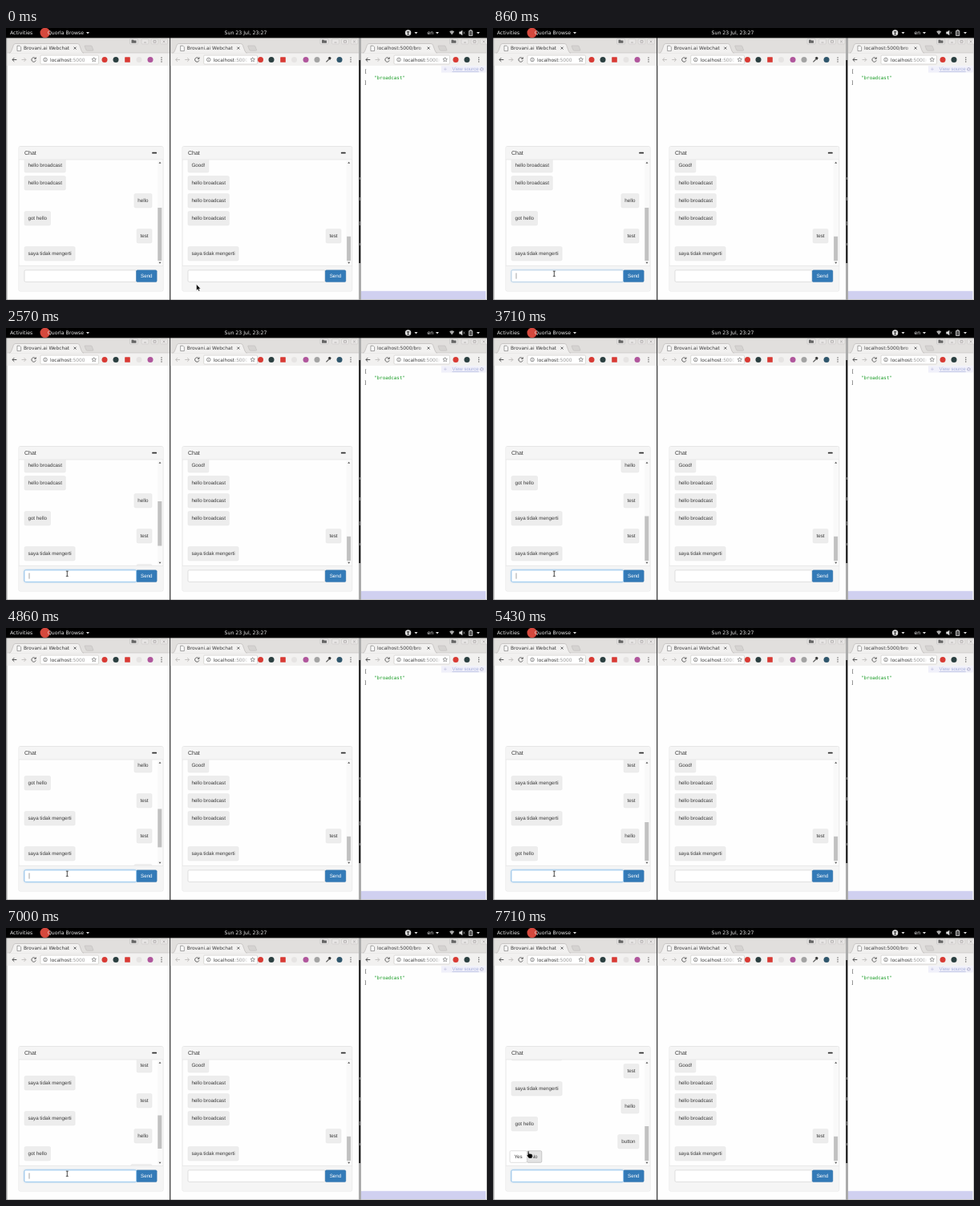
Animation, 600 px wide and 339 px high, one loop 8 s. Source, as an HTML page:

```html
<!DOCTYPE html>
<html lang="en">
<head>
<meta charset="utf-8">
<title>Webchat</title>
<style>
  html, body { margin: 0; width: 100%; height: 100%; overflow: hidden; background: #fff; }
  svg { display: block; width: 600px; height: 339px; }
  text { font: 6.28px "Liberation Sans", Arial, sans-serif; fill: #3a3a3a; text-rendering: geometricPrecision; white-space: pre; }
  text.ui { font: 5.9px "DejaVu Sans", sans-serif; }
  text.shell { font: 6.2px "DejaVu Sans", sans-serif; fill: #e6e6e6; }
  text.mono { font: 5.9px "DejaVu Sans Mono", monospace; }
  text.head { font-size: 7px; }
  .line { fill: none; stroke: #555; stroke-width: .9; }
  .bubble { fill: #ededed; stroke: #e4e4e4; stroke-width: .5; }
  .glow { fill: #fff; stroke: #82bcec; stroke-width: .7; filter: drop-shadow(0 0 1.2px rgba(102, 175, 233, .6)); }
</style>
</head>
<body>
<svg id="stage" viewBox="0 0 600 339">
  <defs>
    <linearGradient id="fade"><stop offset="0" stop-color="#fff" stop-opacity="0"/><stop offset="1" stop-color="#fff"/></linearGradient>
    <linearGradient id="tabFade"><stop offset="0" stop-color="#f2f1f0" stop-opacity="0"/><stop offset="1" stop-color="#f2f1f0"/></linearGradient>
    <clipPath id="body"><rect x="16" y="164" width="416" height="132"/></clipPath>
  </defs>
</svg>
<script>
const LOOP = 8000, PITCH = 22, FIRST_Y = 171.2;
const stage = document.getElementById('stage');

const rect = (x, y, w, h, fill, more = '') =>
  `<rect x="${x}" y="${y}" width="${w}" height="${h}" fill="${fill}" ${more}/>`;
const circle = (x, y, r, fill, more = '') => `<circle cx="${x}" cy="${y}" r="${r}" fill="${fill}" ${more}/>`;
const path = (d, more = 'class="line"') => `<path d="${d}" ${more}/>`;
const text = (x, y, s, cls = '', more = '') => `<text x="${x}" y="${y}" class="${cls}" ${more}>${s}</text>`;
const add = markup => stage.insertAdjacentHTML('beforeend', markup);
const caretDown = x => path(`M${x - 2} 5h4l-2 2.6z`, 'fill="#ddd"');

function star(x, y) {
  const points = Array.from({ length: 10 }, (_, i) => {
    const r = i % 2 ? 1.3 : 2.9, a = i * Math.PI / 5;
    return `${x + r * Math.sin(a)},${y - r * Math.cos(a)}`;
  });
  return `<polygon points="${points.join(' ')}" fill="none" stroke="#666" stroke-width=".6"/>`;
}

function shellBar() {
  return rect(0, 0, 600, 12.4, '#000') +
    text(5, 8.4, 'Activities', 'shell') +
    circle(48.7, 6, 6.2, '#d5483d') +
    text(52, 8.4, 'Quorla Browse', 'shell') + caretDown(102) +
    text(299, 8.4, 'Sun 23 Jul, 23:27', 'shell', 'text-anchor="middle"') +
    circle(501.6, 6, 3.7, '#ddd') +
    path('M499.8 4.9h3.6M501.6 4.2v2.8l-1 1.8M501.6 7l1 1.8', 'stroke="#111" stroke-width=".8" fill="none"') +
    caretDown(511.5) + text(525.5, 8.2, 'en', 'shell') + caretDown(538) +
    path('M553.2 4.4q3-2.4 6 0l-3 4.2z', 'fill="#aaa"') +
    path('M565.5 4.8h1.6l2-1.8v6l-2-1.8h-1.6zM570.4 4.5l2 3M572.4 4.5l-2 3', 'fill="#ddd" stroke="#ddd" stroke-width=".4"') +
    path('M577.6 3.6h1.2v-1h1.8v1h1.2v6h-4.2z', 'fill="#555" stroke="#ddd" stroke-width=".8"') + caretDown(589);
}

// A browser window; ox shifts everything that sits in the tab strip and toolbar.
function browser({ x, w, ox, title, url, port, urlEnd, userX, backColor = '#555', icons, menuX }) {
  const controls = [14, 26, 37.5].map(d => userX + d);
  const extension = ([ix, color, square]) => square
    ? rect(ix - 3.3, 36.2, 6.6, 6.6, color, 'rx=".6"')
    : circle(ix, 39.5, 3.5, color);
  return rect(x, 12, w, 326, '#fefefe') +
    rect(x, 12, w, 19.5, '#e1dfdd') +
    rect(x, 31, w, 16, '#f2f1f0') +
    path(`M${x} 31H${x + w}`, 'stroke="#c3c1bf" stroke-width=".6"') +
    path(`M${ox + 4} 31.4q2-.4 3-3.4l2.4-6.6q.7-1.9 2.6-1.9H${ox + 89}q1.9 0 2.6 1.9l2.4 6.6q1 3 3 3.4`,
      'fill="#f2f1f0" stroke="#b5b3b1" stroke-width=".6"') +
    path(`M${ox + 98.5} 22h7.4q1 0 1.4 1l1.6 4.3q.2.9-.8.9h-6.6q-1.2 0-1.6-1l-1.8-4.3q-.2-.9.4-.9z`,
      'fill="#d5d3d1" stroke="#b9b7b5" stroke-width=".5"') +
    path(`M${ox + 14} 22.2h3l1.6 1.6v4.8h-4.6z`, 'fill="#fff" stroke="#666" stroke-width=".6"') +
    text(ox + 22, 27.4, title, 'ui') +
    rect(ox + 73, 21, 9.5, 9, 'url(#tabFade)', title.includes('/') ? '' : 'opacity="0"') +
    path(`M${ox + 84.6} 23.6l3 3m0-3l-3 3`) +
    rect(userX - 5, 13.4, 10, 6.8, '#e6e4e3', 'stroke="#bbb" stroke-width=".5" rx="1"') +
    path(`M${userX - 3} 14.8h2.4l.8.8h2.8v3.2h-6z`, 'fill="#666"') +
    controls.map(c => rect(c - 4.4, 13.8, 8.8, 6.2, '#e8e6e5', 'stroke="#c4c2c0" stroke-width=".5" rx="1"')).join('') +
    path(`M${controls[0] - 1.5} 18h3M${controls[1] - 1.5} 15.6h3v2.6h-3zM${controls[2] - 1.3} 15.6l2.6 2.6m0-2.6l-2.6 2.6`,
      'fill="none" stroke="#a2a0a0" stroke-width=".7"') +
    path(`M${ox + 13.3} 39.5h-5.4m2.4-2.4l-2.4 2.4 2.4 2.4`, `fill="none" stroke="${backColor}" stroke-width="1"`) +
    path(`M${ox + 19.5} 39.5h5.4m-2.4-2.4l2.4 2.4-2.4 2.4`, 'fill="none" stroke="#c4c2c0" stroke-width="1"') +
    path(`M${ox + 36.8} 37.9a2.7 2.7 0 1 0 .4 2.4M${ox + 37.3} 36.4v2h-2`) +
    rect(ox + 43, 34, urlEnd - ox - 43, 11, '#fff', 'stroke="#c6c4c2" stroke-width=".6" rx="1.2"') +
    circle(ox + 49, 39.5, 2.3, 'none', 'stroke="#666" stroke-width=".7"') +
    path(`M${ox + 49} 39.1v1.6M${ox + 49} 37.8v.6`, 'stroke="#666" stroke-width=".7"') +
    text(ox + 55, 41.6, `${url}<tspan fill="#999">${port}</tspan>`, 'ui') +
    rect(urlEnd - 18, 35, 6.5, 9, 'url(#fade)') + rect(urlEnd - 11.6, 35, 11, 9, '#fff') +
    star(urlEnd - 5.8, 39.5) +
    icons.map(extension).join('') +
    [37, 39.5, 42].map(y => circle(menuX, y, .7, '#555')).join('');
}

// Chat panel frame; the messages are added separately.
function panel(x, right) {
  const inputEnd = right - 33.5;
  return rect(x, 147.5, right - x, 180.5, '#fefefe', 'stroke="#ddd" stroke-width=".7" rx="1.8"') +
    rect(x + .3, 147.9, right - x - .6, 16, '#f5f5f5', 'rx="1.5"') +
    rect(x + .3, 296.3, right - x - .6, 31.4, '#f5f5f5', 'rx="1.5"') +
    path(`M${x} 164h${right - x}M${x} 296.3h${right - x}`, 'stroke="#ddd" stroke-width=".6"') +
    text(x + 7, 158.2, 'Chat', 'head') +
    rect(right - 13.8, 154.8, 5.8, 1.8, '#333', 'rx=".5"') +
    rect(right - 7, 164.4, 6, 131.4, '#f9f9f9') +
    path(`M${right - 5.5} 168.8h3l-1.5-2zM${right - 5.5} 291.8h3l-1.5 2z`, 'fill="#505050"') +
    rect(x + 7, 301.8, inputEnd - x - 7, 14.6, '#fff', 'stroke="#ccc" stroke-width=".6" rx="1.5"') +
    rect(inputEnd, 301.7, 25.7, 14.8, '#337ab7', 'stroke="#2e6da4" stroke-width=".4" rx="1.5"') +
    text(inputEnd + 12.8, 311.3, 'Send', '', 'text-anchor="middle" style="fill:#fff"');
}

// Messages beginning with ">" are the visitor's own and sit on the right.
function addMessages(id, left, right, messages) {
  add(`<g clip-path="url(#body)"><g id="${id}"></g></g>`);
  const list = document.getElementById(id);
  messages.forEach((message, i) => {
    const own = message.startsWith('>'), y = FIRST_Y + i * PITCH;
    list.insertAdjacentHTML('beforeend', `<g><rect class="bubble" y="${y - 8.7}" height="17.4" rx="1.6"/>` +
      text(0, y + 2, message.replace('>', '')) + '</g>');
    const [box, label] = list.lastChild.children;
    const width = label.getComputedTextLength() + 8.8;
    const x = own ? right - width : left;
    box.setAttribute('x', x);
    box.setAttribute('width', width);
    label.setAttribute('x', x + 4.4);
  });
  return list;
}

const red = '#d83a34', dark = '#2b3f40', faint = '#e6e4e3', violet = '#b0569c';
add(rect(0, 0, 600, 339, '#c9c9c9') +
  path('M.9 12V339', 'stroke="#777" stroke-width="1"') +
  path('M204.7 12V339', 'stroke="#3a3a3a" stroke-width="1.3"') +
  rect(440, 12, 3, 327, '#aaa') + rect(440.3, 40, 1.8, 253, '#161616') +
  path('M441.3 186v3M441.3 211v4M441.3 241v5M441.3 268v3', 'stroke="#aaa" stroke-width=".8"') +
  browser({ x: 1.6, w: 202.4, ox: 0, title: 'Brovani.ai Webchat', url: 'localhost', port: ':5000', urlEnd: 115.5, userX: 159.5,
    icons: [[123, red], [137, dark], [151.5, red, 1], [166, faint], [180, violet]], menuX: 194 }) +
  browser({ x: 205.6, w: 234.4, ox: 203.7, title: 'Brovani.ai Webchat', url: 'localhost', port: ':5000', urlEnd: 313.5, userX: 397,
    backColor: '#c4c2c0', menuX: 430,
    icons: [[317.5, red], [331, dark], [345.5, red, 1], [359.5, faint], [374, violet], [388, '#a3a3a3'], [416, '#2f566c']] }) +
  path('M399.4 42.4l3.4-3.4', 'stroke="#555" stroke-width="1.2"') + path('M402 37.4l2-1.2 1.2 1.2-1.2 2z', 'fill="#333" stroke="#333"') +
  browser({ x: 443, w: 156, ox: 441, title: 'localhost:5000/bro', url: 'localhost', port: ':5000/', urlEnd: 553.5, userX: 558.5,
    icons: [[561, red], [575, dark]], menuX: 589.8 }) +
  shellBar() +
  text(446.8, 56, '[', 'mono') + text(459, 63.6, '"broadcast"', 'mono', 'style="fill:#159a22"') + text(446.8, 69.8, ']', 'mono') +
  rect(543, 47.3, 56, 8.2, '#f0f0fa') +
  text(545.5, 53.2, '+', 'ui', 'style="fill:#b4b4d8"') +
  text(556.6, 53.1, 'View source', '', 'style="fill:#a5aedb;font-size:6.1px" text-decoration="underline"') +
  circle(593.4, 51.3, 1.7, 'none', 'stroke="#a9a9c6" stroke-width="1.2" stroke-dasharray="1 .4"') +
  rect(443, 327.8, 155.4, 10.2, '#d0d0f0') +
  panel(16, 196) + panel(220, 431.7) +
  rect(425.1, 259.8, 5, 30.3, '#c1c1c1') +
  '<rect id="thumb" x="189.3" width="5" fill="#c1c1c1"/>' +
  '<rect id="glow" class="glow" x="23" y="301.8" width="139.6" height="14.6" rx="1.5"/>' +
  text(28.7, 311.3, '', '', 'id="typed" style="fill:#555"') +
  rect(28.7, 305.4, .6, 7.2, '#666', 'id="caret"'));

addMessages('other', 227, 418, ['Good!', 'hello broadcast', 'hello broadcast', 'hello broadcast', '>test', 'saya tidak mengerti']);
const list = addMessages('mine', 23, 182, ['hello broadcast', 'hello broadcast', '>hello', 'got hello', '>test',
  'saya tidak mengerti', '>test', 'saya tidak mengerti', '>hello', 'got hello', '>button']);
const bubbles = [...list.children];
list.insertAdjacentHTML('beforeend', '<g id="choice">' +
  rect(42.4, 402.7, 18.4, 14.6, '#fff', 'id="no" stroke="#ccc" stroke-width=".6" rx="1.5"') +
  rect(21, 402.7, 21.4, 14.6, '#fff', 'stroke="#ccc" stroke-width=".6" rx="1.5"') +
  text(31.6, 412.2, 'Yes', '', 'text-anchor="middle"') + text(51.6, 412.2, 'No', '', 'text-anchor="middle"') + '</g>');

add('<g id="pointer">' +
  path('M0 0V7.3L1.7 5.8 2.8 8.3 4.1 7.7 3 5.3H5.1Z', 'data-kind="arrow" fill="#000" stroke="#fff" stroke-width=".4"') +
  path('M-1.5-3.1H1.5M0-3.1V3.1M-1.5 3.1H1.5', 'data-kind="beam" fill="none" stroke="#222" stroke-width=".8"') +
  path('M-.9-2.4q.8-1 1.5 0V.2q3.4 0 4.2 1.3V4L4 6H.4L-2 2.6q0-1.2 1.1-.7z', 'data-kind="hand" fill="#000" stroke="#fff" stroke-width=".4"') +
  '</g>');

// Each step changes only the listed properties, at once.
const steps = [
  [0, { x: 237.6, y: 319.6, kind: 'arrow', focus: 0, caret: 0, typed: '', count: 6, scroll: 0, thumb: [224, 290], choice: 0, hover: 0 }],
  [140, { x: 228, y: 325 }],
  [290, { x: 190, y: 327 }],
  [430, { x: 142, y: 323 }],
  [570, { x: 100, y: 312, kind: 'beam' }],
  [710, { x: 76.3, y: 306.2 }],
  [860, { focus: .55, caret: 1 }],
  [1000, { focus: 1 }],
  [1430, { caret: 0 }],
  [1860, { caret: 1, typed: 'te' }],
  [2000, { typed: 'tes' }],
  [2140, { typed: 'test' }],
  [2570, { typed: '', count: 7, thumb: [216, 271.5] }],
  [2710, { count: 8, scroll: 44, thumb: [234.5, 290] }],
  [3140, { caret: 0 }],
  [3710, { caret: 1 }],
  [4000, { typed: 'he' }],
  [4290, { typed: 'hel' }],
  [4430, { typed: 'hell' }],
  [4570, { typed: 'hello' }],
  [4860, { typed: '', count: 9, thumb: [225.5, 273.3] }],
  [5000, { count: 10, scroll: 88, thumb: [242, 290] }],
  [5430, { caret: 0 }],
  [5860, { caret: 1, typed: 'b' }],
  [6000, { typed: 'bu' }],
  [6140, { typed: 'but' }],
  [6290, { typed: 'butt' }],
  [6430, { typed: 'butto' }],
  [6710, { typed: 'button' }],
  [7000, { typed: '', count: 11, thumb: [233.5, 275] }],
  [7140, { scroll: 125, thumb: [247, 290], choice: 1 }],
  [7570, { x: 61, y: 294, kind: 'arrow', caret: 0 }],
  [7710, { x: 44.3, y: 281, kind: 'hand', hover: 1 }],
];

const $ = id => document.getElementById(id);
const set = (el, attrs) => Object.entries(attrs).forEach(([k, v]) => el.setAttribute(k, v));
const thumb = $('thumb'), glow = $('glow'), typed = $('typed'), caret = $('caret');
const choice = $('choice'), no = $('no'), pointer = $('pointer');

function draw(time) {
  const s = Object.assign({}, ...steps.filter(([at]) => at <= time).map(([, change]) => change));
  bubbles.forEach((b, i) => set(b, { opacity: i < s.count ? 1 : 0 }));
  set(list, { transform: `translate(0 ${-s.scroll})` });
  set(thumb, { y: s.thumb[0], height: s.thumb[1] - s.thumb[0] });
  set(choice, { opacity: s.choice });
  set(no, s.hover ? { fill: '#e3e3e3', stroke: '#adadad' } : { fill: '#fff', stroke: '#ccc' });
  set(glow, { opacity: s.focus });
  typed.textContent = s.typed;
  set(caret, { x: 28.7 + (s.typed ? typed.getComputedTextLength() : 0), opacity: s.caret });
  set(pointer, { transform: `translate(${s.x} ${s.y})` });
  for (const shape of pointer.children) set(shape, { opacity: shape.dataset.kind === s.kind ? 1 : 0 });
}

const start = performance.now();
function tick() {
  draw((performance.now() - start) % LOOP);
  requestAnimationFrame(tick);
}
tick();
</script>
</body>
</html>
```
